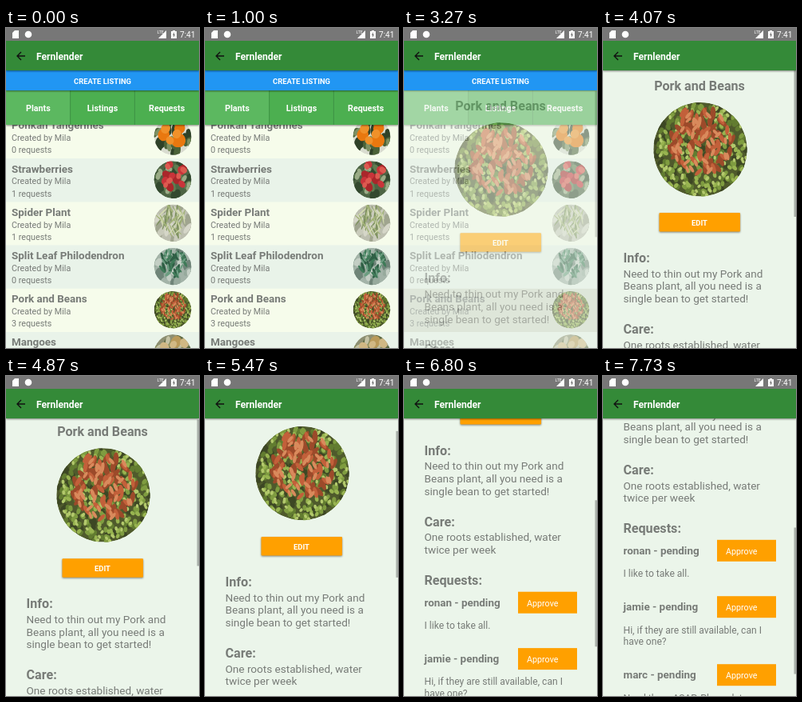
An HTML page that plays this animation: 242x400 px, repeating every 8 s.

```html
<!DOCTYPE html>
<html lang="en">
<head>
<meta charset="utf-8">
<title>Plant exchange app</title>
<style>
  html, body { margin: 0; width: 100%; height: 100%; overflow: hidden; background: #ebf5ea; }
  svg { display: block; width: 100vw; height: 100vh; font-family: Roboto, sans-serif; }
  .b { font-weight: 700; }
  .w { fill: #fff; }
  .g { fill: #777b77; }
  .m { text-anchor: middle; }
  .raised { filter: drop-shadow(0 1px 1px #0007); }
</style>
</head>
<body>
<svg id="stage" viewBox="0 0 242 400">
  <clipPath id="round"><circle r="1"/></clipPath>
  <g id="list"></g>
  <g id="detail">
    <rect y="53" width="242" height="347" fill="#ebf5ea"/>
    <g id="page"></g>
    <rect id="thumb" x="239.5" y="53" width="2.5" height="183" fill="#a9b0a9"/>
  </g>
  <g id="bar"></g>
</svg>
<script>
const $ = id => document.getElementById(id);
const SP = 242 / 360; // stage pixels per density-independent pixel

const text = (s, x, y, sp, cls = "g") =>
  `<text x="${x}" y="${y}" font-size="${sp * SP}" class="${cls}">${s}</text>`;
const rect = (x, y, w, h, fill, more = "") =>
  `<rect x="${x}" y="${y}" width="${w}" height="${h}" fill="${fill}" ${more}/>`;

let seed;
const rnd = (a, b) => {
  seed = seed * 16807 % 2147483647;
  return a + (b - a) * seed / 2147483647;
};

// Spiral of ellipses, from large and dark to small and light
function scatter([colors, n, aspect], spread, rise) {
  const list = colors.split(" ");
  let out = "";
  for (let i = 0; i < n; i++) {
    const u = i / n, a = i * 2.4 + rnd(0, 1), d = spread * Math.sqrt(rnd(0, 1));
    const size = spread * (1.4 - .7 * u) / Math.sqrt(n), k = Math.sqrt(aspect);
    out += `<ellipse rx="${size * k}" ry="${size / k}" fill="${list[Math.floor(u * list.length)]}"
      transform="translate(${d * Math.cos(a)} ${d * Math.sin(a) - rise}) rotate(${rnd(-50, 50)})"/>`;
  }
  return out;
}

function photo(cx, cy, r, { bg, leaves, accents }) {
  seed = 7;
  return `<g transform="translate(${cx} ${cy}) scale(${r})"><g clip-path="url(#round)">
    <circle r="1" fill="${bg}"/>${scatter(leaves, 1, 0)}${scatter(accents, .7, .2)}</g></g>`;
}

// leaves and accents: colours, count, width to height
const plants = [
  { name: "Ponkan Tangerines", n: 0, bg: "#d9dcd0",
    leaves: ["#2f4228 #4b6238 #7d9062", 22, .5], accents: ["#e9780f #f0912a", 8, .9] },
  { name: "Strawberries", n: 1, bg: "#4d6444",
    leaves: ["#33492f #5f7c50 #9aab86", 30, .6], accents: ["#a9272b #c9343a #dd5a50", 15, .8] },
  { name: "Spider Plant", n: 1, bg: "#bdbfb0",
    leaves: ["#a0a58f #c9cbbb #d5d6c8", 18, .4], accents: ["#7f9260 #a3b378 #d3dbb0", 45, .1] },
  { name: "Split Leaf Philodendron", n: 0, bg: "#a3b3a8",
    leaves: ["#6f8478 #97aa9d #c3cec4", 24, .6], accents: ["#2f5f45 #3f7a58 #6b9d80", 36, .3] },
  { name: "Pork and Beans", n: 3, bg: "#4f5a2c",
    leaves: ["#3d4724 #627c30 #7f9c40 #98b450 #b3c96c", 420, .7],
    accents: ["#9c4a2a #c2603a #d98a5c", 110, .4] },
  { name: "Mangoes", n: 2, bg: "#8d8f72",
    leaves: ["#5f6b43 #8a8f5f #c5c3a5", 24, .5], accents: ["#b99a5a #d0b884", 8, .8] }
];

const rows = plants.map((plant, i) => {
  const y = 109 + i * 54.2;
  return rect(0, y, 242, 54.2, i % 2 ? "#e9f3e9" : "#f6fceb") +
    (i === 4 ? rect(0, y, 242, 54.2, "#000", 'id="press" opacity="0"') : "") +
    text(plant.name, 7, y + 17.3, 20, "g b") +
    text("Created by Mila", 7, y + 32.2, 16) +
    text(plant.n + " requests", 7, y + 47.4, 16) +
    photo(209, y + 26.4, 23.3, plant);
}).join("");

const tabs = ["Plants", "Listings", "Requests"].map((name, i) => {
  const w = 242 / 3, x = i * w;
  return rect(x, 78, w, 43, i ? "#4caf50" : "#5cb860") +
    (i ? rect(x - .5, 78, 1, 43, "#3c9342") : "") +
    text(name, x + w / 2, 103.8, 16, "w b m");
}).join("");

$("list").innerHTML = rows + `<g class="raised">${tabs}</g>` +
  rect(0, 53, 242, 25, "#2196f3", 'class="raised"') +
  text("CREATE LISTING", 121, 69.5, 14, "w b m");

const lines = (list, y, sp, step) => list.map((s, i) => text(s, 25.5, y + i * step, sp)).join("");

// The page flows downwards from y
let y = 293;

function section(title, ...body) {
  const out = text(title, 25.5, y, 24, "g b") + lines(body, y + 18.6, 20.2, 15.8);
  y += body.length ? 41.6 + 15.8 * body.length : 26.6;
  return out;
}

function request(name, ...note) {
  const out = text(name + " - pending", 25.5, y, 20, "g b") +
    rect(143, y - 18, 74, 27, "#ffa000") + text("Approve", 154, y, 16, "w") +
    lines(note, y + 28.4, 18, 14.6);
  y += 55.8 + 14.6 * note.length;
  return out;
}

$("page").innerHTML =
  text("Pork and Beans", 121, 78, 24, "g b m") +
  photo(122, 151.7, 58.7, plants[4]) +
  rect(70.5, 231, 101.5, 23.5, "#ffa000", 'rx="1" class="raised"') +
  text("EDIT", 121, 246.8, 14, "w b m") +
  section("Info:", "Need to thin out my Pork and", "Beans plant, all you need is a", "single bean to get started!") +
  section("Care:", "One roots established, water", "twice per week") +
  section("Requests:") +
  request("ronan", "I like to take all.") +
  request("jamie", "Hi, if they are still available, can I", "have one?") +
  request("marc", "Need them ASAP. Please let me");

$("bar").innerHTML =
  rect(0, 16, 242, 37, "#348a38", 'class="raised"') + rect(0, 0, 242, 16, "#777") +
  '<path class="w" d="M11 3h5v10H8V6z"/><circle class="w" cx="28" cy="8" r="4.3"/>' +
  text("LTE", 189.5, 6.5, 8, "w") +
  '<path class="w" d="M201 3v10h-10z"/><path class="w" d="M207 4h2v-1h3v1h2v9h-7z"/>' +
  '<path d="M211 5l-2 4h1v3l2-4h-1z" fill="#777"/>' +
  text("7:41", 218, 12, 15, "w") +
  '<path d="M24 35H14M19 30l-5 5 5 5" fill="none" stroke="#111" stroke-width="1.4"/>' +
  text("Fernlender", 38, 39.8, 18, "w b");

// Finger drag: time and offset, joined smoothly
const drag = [[4600, 0], [5470, 30], [6270, 119], [6800, 194], [7730, 259]];

function speed(i) {
  const a = drag[i - 1], b = drag[i + 1];
  return a && b ? (b[1] - a[1]) / (b[0] - a[0]) : 0;
}

function scrollAt(t) {
  const i = drag.findIndex(p => p[0] > t);
  if (i < 1) return i ? drag.at(-1)[1] : 0;
  const [t0, y0] = drag[i - 1], [t1, y1] = drag[i];
  const d = t1 - t0, u = (t - t0) / d, w = 1 - u;
  return w * w * ((1 + 2 * u) * y0 + u * d * speed(i - 1)) +
    u * u * ((3 - 2 * u) * y1 - w * d * speed(i));
}

const ramp = (t, a, b) => Math.min(1, Math.max(0, (t - a) / (b - a)));

function draw(now) {
  const t = now % 8000;
  const open = 1 - (1 - ramp(t, 3200, 3550)) ** 3;
  const offset = scrollAt(t);
  $("press").setAttribute("opacity", .14 * ramp(t, 2870, 3000));
  $("detail").setAttribute("opacity", open);
  $("detail").setAttribute("transform", `translate(0 ${50 * (1 - open)})`);
  $("page").setAttribute("transform", `translate(0 ${-offset})`);
  $("thumb").setAttribute("y", 53 + offset * .527);
  requestAnimationFrame(draw);
}
requestAnimationFrame(draw);
</script>
</body>
</html>
```
